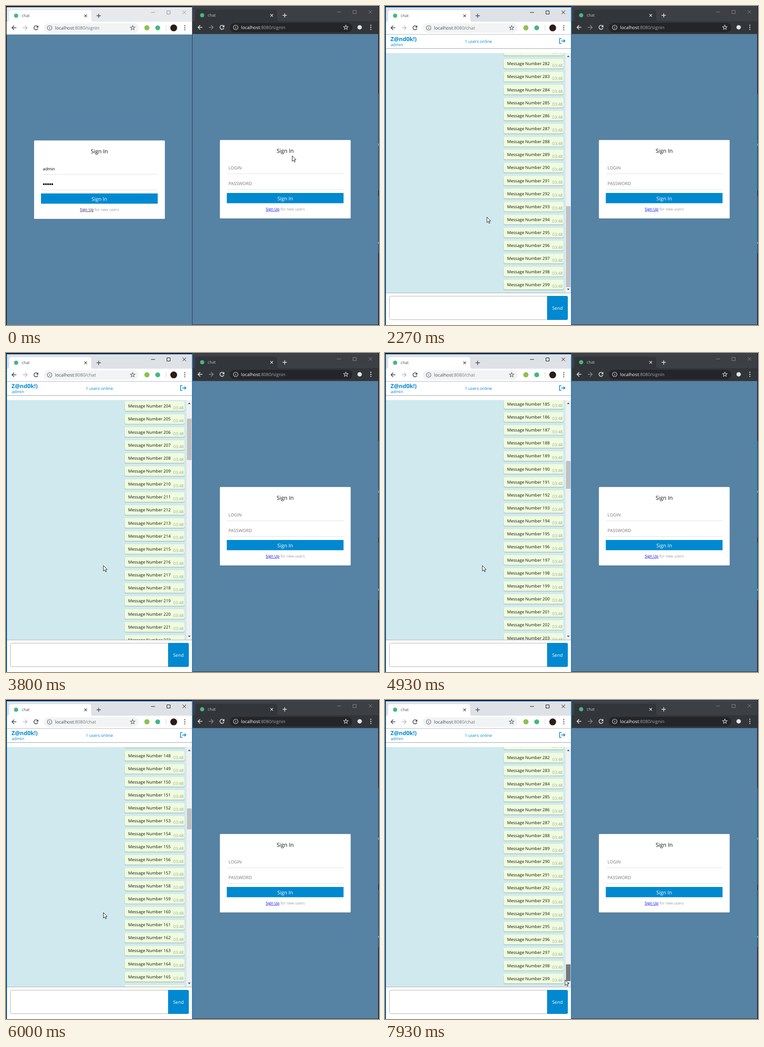
An HTML page that plays this animation: 810x691 px, repeating every 8000 ms.

```html
<!DOCTYPE html>
<html lang="en">
<head>
<meta charset="utf-8">
<title>Chat</title>
<style>
html, body { margin: 0; width: 100%; height: 100%; overflow: hidden; background: #07182f; }
svg { display: block; width: 810px; height: 691px; }
text { font-family: "Open Sans", "Noto Sans", sans-serif; text-rendering: geometricPrecision; white-space: pre; }
</style>
</head>
<body>
<svg id="stage" viewBox="0 0 810 691" xmlns="http://www.w3.org/2000/svg"></svg>
<script>
const BLUE = '#0089d0', LOOP = 8000, STEP = 1000 / 15;
const PITCH = 28.15;        // distance between messages
const HEAD = 75.3;          // list top to the centre of its first message
const LIST = { top: 102, height: 519.5 };
const TRACK = { top: 112, height: 497 };
const LAST = 299, BOTTOM = 7915.3;
const VIEW = 520;

const rect = (x, y, w, h, fill, extra = '') =>
  `<rect x="${x}" y="${y}" width="${w}" height="${h}" fill="${fill}" ${extra}/>`;
const text = (x, y, size, fill, content, extra = '') =>
  `<text x="${x}" y="${y}" font-size="${size}" fill="${fill}" ${extra}>${content}</text>`;
const line = (d, stroke, width = 1, extra = '') =>
  `<path d="${d}" fill="none" stroke="${stroke}" stroke-width="${width}" ${extra}/>`;
const dot = (x, y, r, fill) => `<circle cx="${x}" cy="${y}" r="${r}" fill="${fill}"/>`;
const group = (content, extra = '') => `<g ${extra}>${content}</g>`;
const shift = (x, y) => `transform="translate(${x} ${y})"`;

function star(x, y, color) {
  let d = '';
  for (let i = 0; i < 10; i++) {
    const r = i % 2 ? 2.2 : 5.2, a = (i / 5 - 0.5) * Math.PI;
    d += `${i ? 'L' : 'M'}${(x + r * Math.cos(a)).toFixed(2)} ${(y + r * Math.sin(a)).toFixed(2)}`;
  }
  return line(d + 'Z', color, 1.1);
}

function captionButtons(color, id) {
  return line('M315 14H323.5M349.5 10.5h7v7h-7ZM383.5 10l7.5 7.5M391 10l-7.5 7.5', color, 1, id);
}

function browser(c) {
  return rect(1.5, 2.5, 403, 59, c.strip, c.stripId) +
    `<path d="M2 34.5Q7 34.5 7 29V14Q7 9 12 9H180Q185 9 185 14V29Q185 34.5 190 34.5Z" fill="${c.bar}"/>` +
    rect(1.5, 34, 403, 27.5, c.bar) +
    dot(22, 21, 4.6, '#41b883') +
    text(34, 24.3, 8.7, c.title, 'chat') +
    line('M170.2 18.5l5.6 5.6M175.8 18.5l-5.6 5.6', c.icon, 1.2) +
    line('M196.7 21.3h9.2M201.3 16.7v9.2', c.icon, 1.4) +
    line('M22.5 47.3H13.2M17.7 42.6L13 47.3l4.7 4.7', c.icon, 1.5) +
    line('M36.5 47.3H45.8M41.3 42.6L46 47.3l-4.7 4.7', c.dim, 1.4) +
    line('M68.5 44.3A4.4 4.4 0 1 0 69.3 48.6', c.icon, 1.5) +
    `<path d="M70.2 42v4.8h-4.8Z" fill="${c.icon}"/>` +
    rect(82, 37.5, c.pill, 20.5, c.field, 'rx="10.2"') +
    `<circle cx="94.8" cy="47.4" r="4.9" fill="none" stroke="${c.info}" stroke-width="1.1"/>` +
    line('M94.8 46.6v3.4M94.8 44.4v1.2', c.info, 1.1) +
    text(106.5, 51, 9.75, c.host, `localhost<tspan fill="${c.path}">:8080<tspan ${c.pathId}>/signin</tspan></tspan>`) +
    star(c.star, 47.4, c.info) +
    [42.8, 47.2, 51.6].map(y => dot(388.3, y, 1.2, c.icon)).join('');
}

function signIn(login, password, link, buttonId) {
  return rect(61, 292, 284, 170.5, '#000', 'rx="2" opacity=".12"') +
    rect(61, 291.2, 284, 170, '#fff', 'rx="1.5"') +
    text(202.8, 318.6, 11.9, '#111', 'Sign In', 'text-anchor="middle"') +
    login + password +
    rect(76, 364, 254, 1, '#e2e2e2') + rect(76, 398, 254, 1, '#e2e2e2') +
    rect(76, 406, 253.5, 22.2, BLUE, buttonId) +
    text(202.8, 421.6, 10.9, '#fff', 'Sign In', 'text-anchor="middle"') +
    text(160.6, 444.3, 8.35, '#999', `<tspan fill="${link}" text-decoration="underline">Sign Up</tspan> for new users`);
}

const spinner = (id, x, y) => group(
  line('M-15.2 15.2A21.5 21.5 0 1 1 15.2 15.2', '#6fadde', 1.7, `id="${id}"`), shift(x, y));

const bullets = [0, 1, 2, 3, 4].map(i => dot(82.2 + 4.55 * i, 386, 1.9, '#000')).join('');

const bubble = group(
  rect(257.5, -9.3, 130.5, 21, '#8fa9a6', 'rx="3.5" opacity=".75"') +
  rect(257.8, -10.5, 130, 21, '#effcdd', 'rx="3.5"') +
  text(265.3, 3.2, 9.05, '#111', '') +
  text(386, 6.6, 9, '#9fa9a0', '03:48', 'text-anchor="end"'), 'class="bubble"');

const chat = rect(1.5, 62, 402.5, 629, '#fff') +
  text(12, 75.8, 12.4, BLUE, 'Z@nd0k!)', 'font-weight="700"') +
  text(12.5, 87.4, 9.1, BLUE, 'admin') +
  text(173.3, 80, 9.05, BLUE, '1 users online') +
  line('M383 70.6h-4v10.3h4M382.5 75.7h8M387.6 72.6l3.2 3.1-3.2 3.1', BLUE, 1.5) +
  rect(1.5, 91.5, 402.5, 1.2, '#a9aeb1') +
  rect(1.5, LIST.top, 402.5, LIST.height, '#d0e9ee') +
  group(spinner('loader', 0, 0) + bubble.repeat(21), 'id="list" clip-path="url(#listClip)"') +
  rect(392, LIST.top, 12, LIST.height, '#f1f1f1') +
  rect(393, 0, 10, 0, '#c1c1c1', 'id="thumb"') +
  '<path d="M395 110.4h6l-3-3.2ZM395 612.2h6l-3 3.2Z" fill="#505050"/>' +
  rect(1.5, 621, 402.5, 1.2, '#b4b8ba') +
  rect(9.5, 628.5, 345, 51, '#fff', 'rx="3" stroke="#b2b2b2"') +
  '<path d="M352 628h42q3 0 3 3v46q0 3-3 3h-42Z" fill="#0089d0"/>' +
  text(374.5, 658, 9.9, '#fff', 'Send', 'text-anchor="middle"');

const light = {
  strip: '#e7eaed', stripId: 'id="strip"', bar: '#fff', title: '#4a4d51', icon: '#45484c', dim: '#b9bbbe',
  pill: 206, field: '#f1f3f4', info: '#5f6368', host: '#46494d', path: '#73777b', pathId: 'id="path"', star: 275
};
const dark = {
  strip: '#3c4044', stripId: '', bar: '#323539', title: '#c6c9cc', icon: '#e4e6e8', dim: '#85888c',
  pill: 266, field: '#232529', info: '#d4d7da', host: '#fff', path: '#a2a6aa', pathId: '', star: 334
};

const stage = document.getElementById('stage');
stage.innerHTML =
  `<clipPath id="listClip">${rect(1.5, LIST.top, 390.5, LIST.height, '#000')}</clipPath>` +
  rect(0, 0, 810, 691, '#07182f') +
  rect(808.5, 190, 1.5, 345, '#0b5a96') + rect(808.5, 298, 1.5, 5, '#8fb4cc') +
  rect(808.5, 400, 1.5, 11, '#07182f') + rect(808.5, 511, 1.5, 4, '#9cc3c8') +
  // right window
  rect(404.5, 1, 404, 689.3, '#5682a3') +
  group(browser(dark) + captionButtons('#85898d', '') + dot(364, 47.2, 4.8, '#e4e6e8'), shift(404, -1)) +
  group(signIn(text(79.8, 355.4, 9.45, '#757575', 'LOGIN'), text(79.8, 388.9, 9.55, '#757575', 'PASSWORD'), '#0000ee', ''),
    shift(403.5, -1)) +
  // left window
  rect(1.5, 61, 403, 630, '#5682a3') +
  browser(light) + captionButtons('#8d9093', 'id="caption"') +
  dot(306, 47.2, 5.6, '#8cc152') + dot(329.5, 47.2, 5.3, '#41b883') +
  rect(347, 41, 1, 12.5, '#d3d5d8') + dot(364.2, 47.4, 7.4, '#2b1c17') +
  group(signIn(text(80, 355.6, 8.9, '#000', 'admin'), bullets, '#35175c', 'id="button"'), 'id="signin"') +
  group(rect(1.5, 61, 403, 630, '#fff') +
    text(202.8, 353.8, 14.2, '#62a3d8', 'Please, wait...', 'text-anchor="middle"') +
    spinner('waiter', 203, 386.5), 'id="wait"') +
  group(chat, 'id="chat"') +
  rect(1.5, 61, 403, 1, '#b6b9bb', 'id="rule"') +
  line('M404.5 2V691', '#34383d') +
  line('M1.5 691V2.5H404.5V691', '#0078d7', 1.2, 'id="frame"') +
  group('<path d="M.5 .5V12.3L3.3 9.7 5.2 14 7.1 13.2 5.2 9H8.8Z" fill="#fff" stroke="#111" stroke-width=".9"/>', 'id="cursor"');

const el = {};
stage.querySelectorAll('[id]').forEach(node => el[node.id] = node);
const bubbles = [...stage.querySelectorAll('.bubble')];
const set = (node, name, value) => node.setAttribute(name, value);
const show = (node, on) => set(node, 'display', on ? 'inline' : 'none');

// Linear interpolation over rows of [time, ...values].
function along(keys, t) {
  let i = keys.findIndex(k => k[0] > t);
  if (i < 0) return keys[keys.length - 1].slice(1);
  if (i === 0) return keys[0].slice(1);
  const a = keys[i - 1], b = keys[i], f = (t - a[0]) / (b[0] - a[0]);
  return a.slice(1).map((v, j) => v + (b[j + 1] - v) * f);
}

const listStart = first => first * PITCH - HEAD;

const pointerKeys = [
  [200, 621, 324], [333, 605, 324], [467, 605, 324], [1267, 290, 424], [1400, 290, 424],
  [1600, 293, 433], [1800, 293, 433], [2330, 211, 460], [7000, 211, 460], [7333, 399, 244.5],
  [7400, 399, 244.5], [7933, 390.5, 606]
];
const scrollKeys = [
  [2330, BOTTOM], [2667, listStart(250)], [2800, listStart(250)], [2867, 6946.5], [3000, 6560],
  [3267, 6560], [3533, 6060], [3600, 6060], [3800, 5729.6], [3933, listStart(200)],
  [4600, listStart(200)], [4933, 5199.8], [5133, 4800], [5200, 4800], [5533, listStart(150)],
  [6000, listStart(150)], [6133, 3780], [6200, 3780], [6533, listStart(100)],
  [7400, listStart(100)], [7933, BOTTOM]
];
const loadTimes = [2790, 4320, 5790, 6920];

function drawList(t, spin) {
  const [pos] = along(scrollKeys, t);
  const first = 250 - 50 * loadTimes.filter(at => t >= at).length;
  const scrollTop = pos - listStart(first);
  const scale = TRACK.height / (BOTTOM + VIEW - listStart(first));
  set(el.thumb, 'y', TRACK.top + scrollTop * scale);
  set(el.thumb, 'height', VIEW * scale);
  set(el.thumb, 'fill', t >= 7390 ? '#787878' : '#c1c1c1');
  set(el.loader.parentNode, 'transform', `translate(197 ${LIST.top + 33 - scrollTop})`);
  set(el.loader, 'transform', spin);

  const from = Math.floor(pos / PITCH) - 1;
  bubbles.forEach((node, i) => {
    const n = from + i;
    show(node, n >= first && n <= LAST);
    set(node, 'transform', `translate(0 ${(LIST.top + n * PITCH - pos).toFixed(2)})`);
    node.querySelector('text').textContent = 'Message Number ' + n;
  });
}

function draw(ms) {
  const t = Math.floor((ms + 5) / STEP) * STEP;
  const active = t >= 1460, waiting = t >= 1590, chatting = t >= 1860;
  const [x, y] = along(pointerKeys, t);
  const spin = `rotate(${(8 + (t - 1600) * 0.36).toFixed(1)})`;

  set(el.strip, 'fill', active ? '#dee1e6' : light.strip);
  set(el.caption, 'stroke', active ? '#111' : '#8d9093');
  show(el.frame, active);
  show(el.rule, waiting);
  el.path.textContent = t >= 1725 ? '/chat' : waiting ? '' : '/signin';

  show(el.signin, !waiting);
  show(el.wait, waiting && !chatting);
  show(el.chat, chatting);
  const hover = x > 76 && x < 330 && y > 406 && y < 428;
  set(el.button, 'fill', hover ? '#007dbf' : BLUE);
  set(el.waiter, 'transform', spin);
  if (chatting) drawList(t, spin);
  set(el.cursor, 'transform', `translate(${x.toFixed(1)} ${y.toFixed(1)})`);
}

const start = performance.now();
function tick() {
  draw((performance.now() - start) % LOOP);
  requestAnimationFrame(tick);
}
tick();
</script>
</body>
</html>
```
